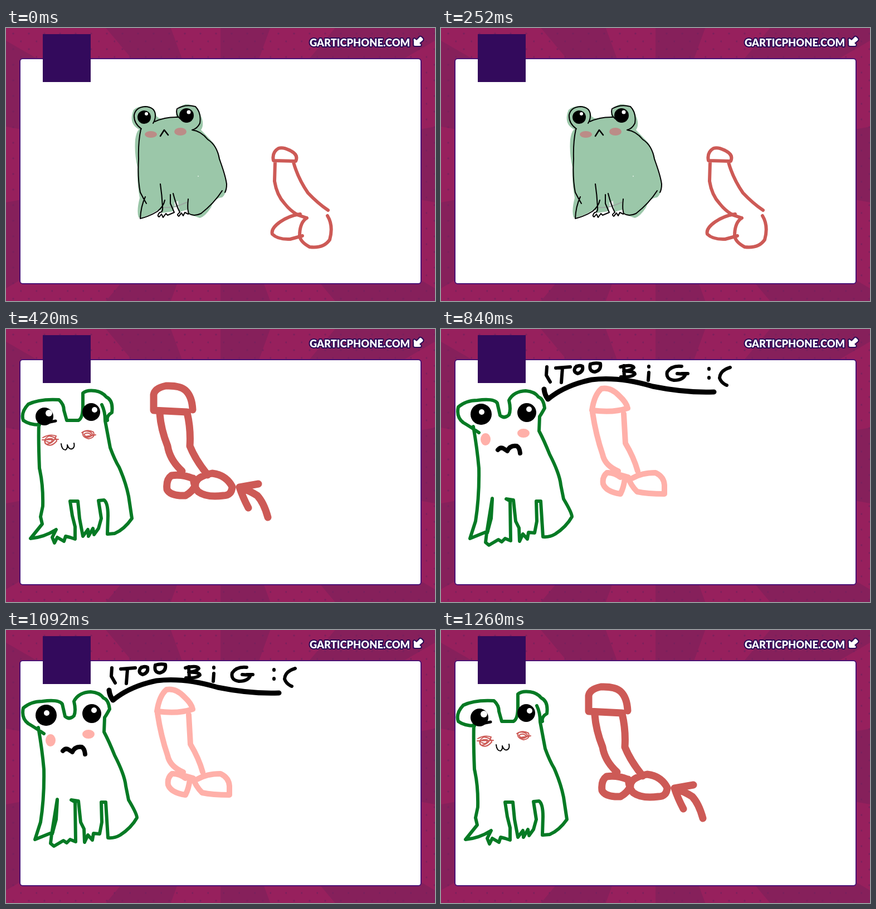
An HTML page for the animation above (1.68 s loop, 770 by 490 pixels).

```html
<!DOCTYPE html>
<html lang="en">
<head>
<meta charset="utf-8">
<title>Frog doodles</title>
<style>
html, body { margin: 0; width: 100%; height: 100%; overflow: hidden; background: #97205d; }
svg { display: block; width: 100vw; height: 100vh; }
.ink { fill: none; stroke-linecap: round; stroke-linejoin: round; }
.url { font: 900 18.3px Lato, "Open Sans", sans-serif; }
.label { fill: #fff; stroke: #2b0a56; stroke-width: 4; stroke-linejoin: round; paint-order: stroke; }
</style>
</head>
<body>
<svg viewBox="0 0 770 490" preserveAspectRatio="none">
  <defs>
    <pattern id="dots" width="28" height="28" patternUnits="userSpaceOnUse">
      <g fill="#75205c" fill-opacity=".75">
        <circle cx="13" cy="10" r="1.8"/>
        <circle cx="27" cy="24" r="1.8"/>
      </g>
    </pattern>
  </defs>
  <rect width="770" height="490" fill="#97205d"/>
  <path id="rays" fill="#86205b"/>
  <rect width="770" height="490" fill="url(#dots)"/>
  <rect x="25" y="55" width="720" height="404" rx="5" fill="#fff" stroke="#4b1275" stroke-width="2"/>
  <g id="scenes"></g>
  <rect x="66" y="11" width="86" height="86" fill="#330a5c"/>
  <text class="url label" x="635" y="33" text-anchor="middle">GARTICPHONE.COM</text>
  <path class="label" d="M733 19Q731 20 732 23V30Q732 32 734 32H743Q746 31 744 29L742 27L748 22Q749 20 748 19L745 16Q743 15 742 17L737 22Z"/>
</svg>
<script>
const HOLD = 420;
const ORDER = [0, 1, 2, 1];
const BLACK = '#000', GREEN = '#067a24', RED = '#cd5a56', PINK = '#ffb0a9';

const ink = (color, width, d) =>
  `<path class="ink" stroke="${color}" stroke-width="${width}" d="${d}"/>`;
const blob = (color, x, y, rx, ry = rx) =>
  `<ellipse cx="${x}" cy="${y}" rx="${rx}" ry="${ry}" fill="${color}"/>`;
const eye = (x, y, r, hx, hy, hr) => blob(BLACK, x, y, r) + blob('#fff', hx, hy, hr);

function filledFrog() {
  const skin = `M229 147Q236 140 252 140Q267 141 270 158Q275 164 285 162L305 160
    Q305 141 322 137Q345 137 349 156Q357 172 350 183L372 206Q383 222 388 252L397 283
    Q394 300 388 304Q374 305 368 322Q358 338 348 341L330 335L326 326L312 330L302 318
    L300 329L280 332L276 325L262 333Q244 342 238 340Q234 328 240 305Q235 280 236 250
    Q230 225 232 200Q234 186 239 182Q219 172 229 147Z`;
  return `<path fill="#9bc7a9" d="${skin}"/>` +
    `<path fill="#e6e9e8" d="M302 313L309 310L311 328L303 321Z"/>` +
    ink('#9aaaa1', 2, 'M283 322Q301 324 324 313') +
    ink(BLACK, 2, `M243 181Q229 171 230 156Q233 142 250 141Q268 142 268 157Q268 165 264 171
      M267 168Q286 159 310 160M317 166Q303 158 307 145Q322 136 340 141Q351 152 348 171
      Q343 181 334 183Q350 185 362 200Q379 211 383 235Q394 265 396 280Q396 290 393 295
      M242 182Q237 205 238 235Q236 270 241 295Q246 305 252 315
      M250 303Q242 320 241 342Q258 338 272 329Q283 320 285 309
      M277 280Q280 300 281 321Q282 331 276 331Q270 337 275 339L279 334L282 340L287 333
      L290 336L302 331L295 315V299M300 297Q305 317 312 331Q305 335 310 338L315 332
      L318 337L321 331L327 334M327 307Q325 325 328 333Q337 339 350 333Q374 314 388 292`) +
    eye(248, 160, 12, 252, 154, 3) + eye(324, 157, 13, 328, 151, 3.5) +
    blob('#bb8c87', 260, 191, 11, 6) + blob('#bb8c87', 313, 186, 11, 7) +
    blob('#e5f2e9', 345, 266, 1) +
    ink(BLACK, 2.5, 'M277 194L284 183L291 192') +
    ink(RED, 6, `M480 238Q477 223 489 216Q498 213 512 221Q525 228 520 239Z
      M483 240L482 275Q486 300 500 315Q511 329 525 336L540 341
      M516 241Q524 270 542 296Q560 315 578 327
      M528 334Q510 336 492 348Q475 360 478 370Q488 380 510 379L532 373
      M540 341Q528 348 527 370Q526 383 545 393Q570 396 581 380Q588 355 577 337`);
}

function happyFrog() {
  return ink(GREEN, 6, `M60 172Q42 172 31 164Q26 150 40 135Q60 125 95 127Q104 135 104 146
      L109 164L130 164Q138 160 138 138V115Q145 109 160 111Q173 113 180 122
      Q193 128 190 150Q180 156 182 164M172 136Q178 148 178 165L187 213Q195 235 203 248
      Q215 275 220 300L226 340Q212 360 195 367L183 368
      M59 170Q58 200 60 250Q67 280 66 318L62 337L65 350L44 376Q68 374 90 360L83 374
      L87 384L92 374L104 381L107 372L115 374L124 377V355L119 335L115 309H129
      L132 340L138 372L147 360L148 372L156 358L158 369L166 358L171 340L166 308L176 307
      Q183 312 183 335L182 368`) +
    eye(69, 157, 16, 77, 151, 6) + ink(BLACK, 5, 'M74 168L89 165') +
    eye(153, 149, 16, 159, 145, 5) +
    ink(RED, 2, `M66 195Q78 188 90 192Q86 205 73 207Q64 200 77 192Q91 194 91 201
      Q80 214 70 205Q70 195 83 197Q83 207 73 202M65 199L94 198
      M136 186Q146 179 157 185Q161 195 148 197Q134 193 139 184Q151 181 156 190Q145 199 140 189
      Q147 184 153 190M142 193L161 190`) +
    ink(BLACK, 2, 'M99 206Q100 217 107 217Q111 214 110 208Q113 217 119 215Q124 212 122 205') +
    ink(RED, 13, `M335 145Q334 121 322 110Q312 101 287 102Q267 106 265 118V146L325 149
      M276 152Q278 180 290 210Q294 235 316 255M325 150Q332 180 330 210Q340 235 362 262
      M335 268Q315 260 297 263Q287 270 289 288Q295 300 322 299Q335 292 340 280
      Q340 265 370 259Q395 262 406 283Q405 299 390 299Q360 303 345 292Q338 285 336 268
      M470 338Q463 312 451 299Q437 290 419 284L453 278M419 284Q425 302 435 321`);
}

function sadFrog() {
  return ink(GREEN, 6, `M68 186Q52 175 40 168Q27 158 31 140Q45 128 65 128Q95 124 101 133
      L106 155Q114 162 122 154Q126 145 122 128Q130 112 152 111Q168 112 175 122
      Q184 125 186 142Q180 153 177 157L176 183Q185 200 195 225Q213 260 215 280L220 305
      Q235 330 235 337Q225 355 205 368Q195 374 183 373L179 309H171L172 345L168 366
      L157 365L155 377L147 368L141 381L140 357L134 345L130 307L117 305L124 309L125 380
      L115 376L109 382L103 378L86 388L80 383L82 366L92 304L84 363L52 376L62 345
      Q69 300 68 250Q65 215 58 175M92 306L90 340L83 366`) +
    eye(72, 153, 19, 73, 149, 5) + eye(154, 150, 17, 158, 144, 5) +
    blob(PINK, 80, 198, 9, 11) + blob(PINK, 148, 187, 11, 8) +
    ink(BLACK, 8, 'M102 217Q107 211 113 215L119 219Q124 208 136 210Q141 213 142 223') +
    ink(PINK, 10, `M271 146Q275 118 288 107Q305 104 320 120Q333 132 335 142Q310 151 271 146
      M272 150Q278 190 290 225Q294 245 318 255M328 152L331 205Q346 230 353 255
      M322 266Q310 257 298 258Q289 265 291 278Q296 292 322 296Q328 285 330 268
      M343 268Q360 258 385 258Q400 265 401 280V296Q370 296 352 292Q340 280 336 266L322 262`) +
    ink(BLACK, 9, 'M490 113Q440 115 380 103Q320 85 270 91Q222 101 192 126Q186 118 185 108') +
    ink(BLACK, 6, `M190 68L189 83L196 95M206 70L232 68M218 70L216 96
      M243 67Q235 76 245 80Q256 77 254 67Q247 64 241 69
      M268 63Q265 76 276 77Q288 74 286 62Q277 60 268 63
      M328 66L329 86M322 68Q343 63 346 69Q343 74 328 76Q347 75 348 81Q342 87 323 86
      M373 78L372 92M373 67V68
      M432 67Q414 65 406 77Q403 90 418 92Q435 92 439 81L424 80M432 80H443
      M481 71V72M481 87V88M519 69Q501 74 500 88Q503 97 513 101`);
}

// Alternating wedges, one pair centred on the horizontal
const WEDGES = 18, STEP = 2 * Math.PI / WEDGES;
const rim = k => `${385 + 600 * Math.cos(k * STEP)} ${245 + 600 * Math.sin(k * STEP)}`;
let rays = '';
for (let k = 0; k < WEDGES; k += 2) rays += `M385 245L${rim(k - .5)}L${rim(k + .5)}Z`;
document.getElementById('rays').setAttribute('d', rays);

const layer = document.getElementById('scenes');
layer.innerHTML = [filledFrog, happyFrog, sadFrog].map(draw => `<g>${draw()}</g>`).join('');
const scenes = [...layer.children];

function render(t) {
  const shown = ORDER[Math.floor(t / HOLD) % ORDER.length];
  scenes.forEach((g, i) => g.setAttribute('display', i === shown ? 'inline' : 'none'));
}

const start = performance.now();
function tick() {
  render(performance.now() - start);
  requestAnimationFrame(tick);
}
tick();
</script>
</body>
</html>
```
